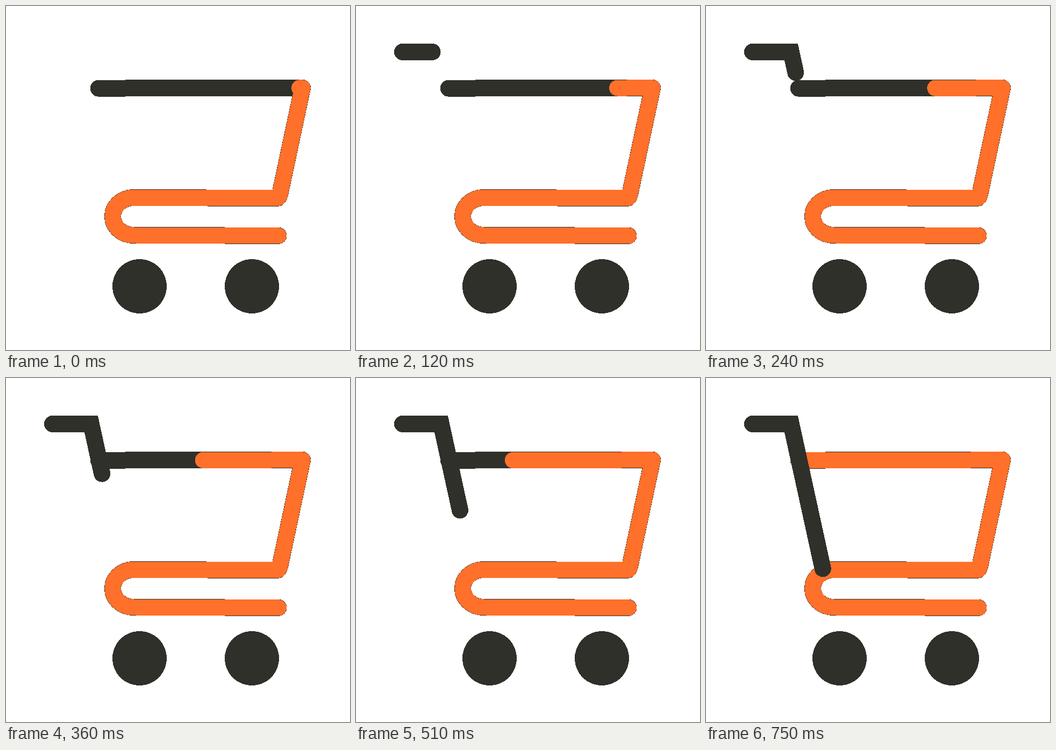
An HTML page that plays this animation: 640x640 px, repeating every 0.93 s.

```html
<!DOCTYPE html>
<html lang="en">
<head>
<meta charset="utf-8">
<title>Shopping cart</title>
<style>
  html, body { margin: 0; width: 100%; height: 100%; overflow: hidden; background: #fff; }
  svg { display: block; shape-rendering: crispEdges; }
  path { fill: none; stroke-linecap: round; stroke-linejoin: round; }
  circle { fill: #2f302a; }
  #track, #handle { stroke: #2f302a; stroke-width: 31; }
  #frame { stroke: #ff702a; stroke-width: 30; }
  #handle { stroke-linejoin: miter; }
</style>
</head>
<body>
<svg width="640" height="640" viewBox="0 0 640 640">
  <path id="track"/>
  <path id="frame"/>
  <circle cx="248.5" cy="521.5" r="50.5"/>
  <circle cx="457.5" cy="521.5" r="50.5"/>
  <path id="handle"/>
</svg>
<script>
const LOOP = 930, DRAW = 750, STEP = 30;

const GRIP = [86.4, 85.4], ELBOW = [158.4, 85.4], FOOT = [217.3, 354.7];
const RIM_LEFT = [172.2, 153.1], RIM_TIP = [546, 152.45];

// Lower rail, rounded turn, upper rail and the rising edge to the basket rim.
const RAILS = 'M507 427.3 L238 426.5 A39.5 35 0 0 1 238 356.5 ' +
  'L504 357.5 Q508 357.5 509.6 350 L551.6 152.4';

const track = document.getElementById('track');
const frame = document.getElementById('frame');
const handle = document.getElementById('handle');

const lerp = (a, b, k) => a.map((v, i) => v + (b[i] - v) * k);
const distance = (a, b) => Math.hypot(b[0] - a[0], b[1] - a[1]);

function handlePath(k) {
  const bar = distance(GRIP, ELBOW), post = distance(ELBOW, FOOT);
  const drawn = k * (bar + post);
  const points = [GRIP, lerp(GRIP, ELBOW, Math.min(1, drawn / bar))];
  if (drawn > bar) points.push(lerp(ELBOW, FOOT, (drawn - bar) / post));
  return 'M' + points.join(' L');
}

function draw(time) {
  const k = Math.min(1, Math.floor(time % LOOP / STEP) * STEP / DRAW);
  frame.setAttribute('d', `${RAILS} L${lerp(RIM_TIP, RIM_LEFT, k)}`);
  handle.setAttribute('d', k > 0 ? handlePath(k) : '');
}

track.setAttribute('d', `${RAILS} L${RIM_LEFT}`);

const start = performance.now();
function tick() {
  draw(performance.now() - start);
  requestAnimationFrame(tick);
}
tick();
</script>
</body>
</html>
```
